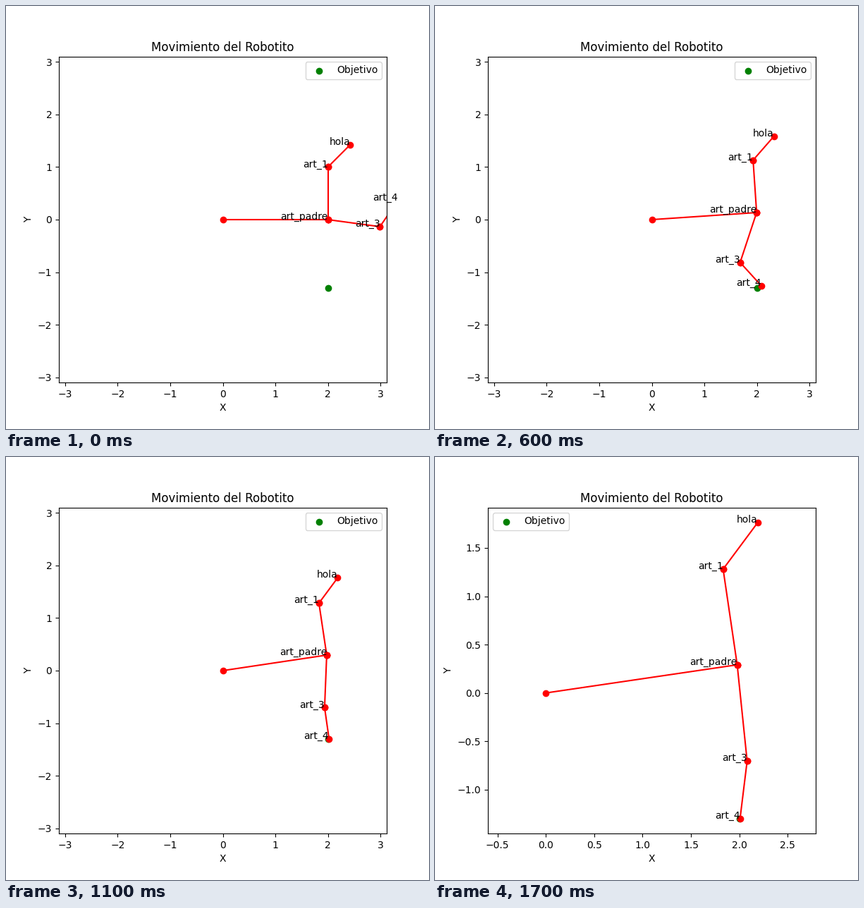
Animation, 600 px wide and 600 px high, one loop 1800 ms. Source, as a matplotlib script:

```python
import numpy as np
import matplotlib.pyplot as plt
from matplotlib.animation import FuncAnimation

FRAMES, INTERVAL = 18, 100
TARGET = (2, -1.3)

# Key poses of the three driven joints, in degrees relative to the parent link.
KEY_STEPS = np.array([0, 2, 4, 6, 9, 11, 15, 17])
BASE = np.array([0, 0, 0, 3.85, 7.8, 8.5, 8.4, 8.37])
ELBOW = np.array([-7.7, -58, -119.3, -112.15, -105.8, -100.8, -93.9, -92.47])
WRIST = np.array([63.2, 77, 88.5, 60.6, 26, 10.4, -9, -12.9])

# name, parent, length
LINKS = [
    ("art_padre", None, 2),
    ("art_1", "art_padre", 1),
    ("hola", "art_1", 0.6),
    ("art_3", "art_padre", 1),
    ("art_4", "art_3", 0.6),
]


def glide(keys, step):
    """Cubic Hermite interpolation through the key poses."""
    i = min(np.searchsorted(KEY_STEPS, step, side="right") - 1, len(keys) - 2)
    h = KEY_STEPS[i + 1] - KEY_STEPS[i]
    u = (step - KEY_STEPS[i]) / h
    slope = np.gradient(keys, KEY_STEPS) * h
    blend = u * u * (3 - 2 * u)
    return (keys[i] * (1 - blend) + keys[i + 1] * blend
            + slope[i] * u * (1 - u) ** 2 - slope[i + 1] * u * u * (1 - u))


def pose(step):
    """Return {name: (start, end)} for every link."""
    turns = {
        "art_padre": max(0, glide(BASE, step)),
        "art_1": 90,
        "hola": -45,
        "art_3": glide(ELBOW, step),
        "art_4": glide(WRIST, step),
    }
    ends, angles = {None: np.zeros(2)}, {None: 0}
    segments = {}
    for name, parent, length in LINKS:
        angles[name] = angles[parent] + turns[name]
        a = np.radians(angles[name])
        ends[name] = ends[parent] + length * np.array([np.cos(a), np.sin(a)])
        segments[name] = (ends[parent], ends[name])
    return segments


fig = plt.figure(figsize=(6, 6), dpi=100)
ax = fig.add_subplot()
ASPECT = 465 / 462  # axes width over height


def set_view(center, half_height):
    cx, cy = center
    half_width = half_height * ASPECT
    ax.set_xlim(cx - half_width, cx + half_width)
    ax.set_ylim(cy - half_height, cy + half_height)


def draw(step):
    ax.clear()
    segments = pose(step)
    for name, (start, end) in segments.items():
        ax.plot([start[0], end[0]], [start[1], end[1]], "ro-")
        ax.text(end[0], end[1], name, ha="right")
    ax.scatter(*TARGET, color="green", label="Objetivo")

    if step == FRAMES - 1:
        # Zoom in to fit the settled arm with a 5% margin.
        points = np.array([p for seg in segments.values() for p in seg] + [TARGET])
        low, high = points.min(axis=0), points.max(axis=0)
        set_view((low + high) / 2, 0.55 * (high - low)[1])
        corner = "upper left"
    else:
        set_view((0, 0), 3.1)
        corner = "upper right"

    ax.set_title("Movimiento del Robotito")
    ax.set_xlabel("X")
    ax.set_ylabel("Y")
    ax.legend(loc=corner)
    return []


anim = FuncAnimation(fig, draw, frames=FRAMES, init_func=lambda: draw(0),
                     interval=INTERVAL, repeat=True, repeat_delay=0)
plt.show()
```
